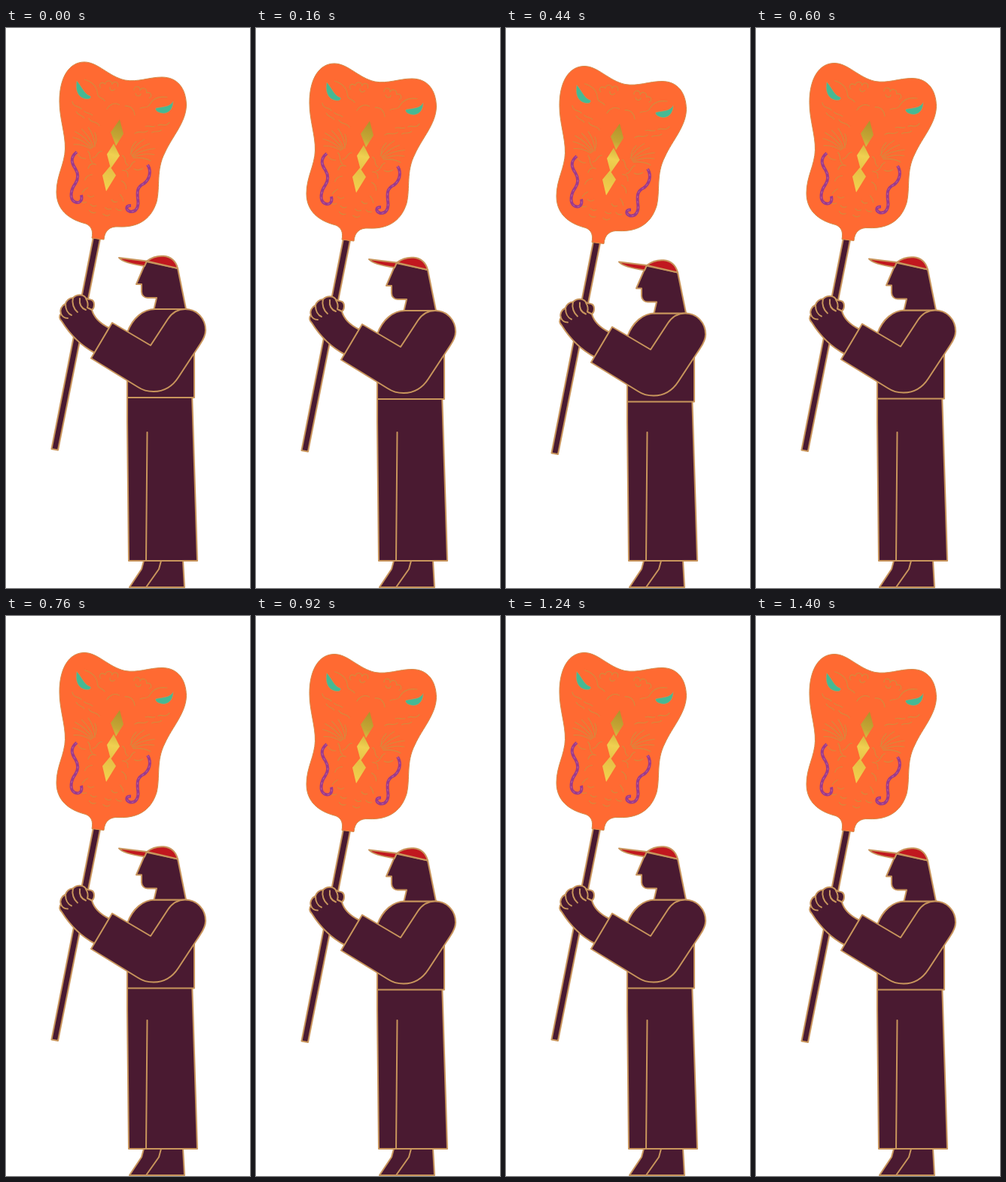
An HTML page that plays this animation: 324x741 px, repeating every 1.44 s.

```html
<!DOCTYPE html>
<html lang="en">
<head>
<meta charset="utf-8">
<title>Figure with a fan</title>
<style>
  html, body { margin: 0; width: 100%; height: 100%; overflow: hidden; background: #fff; }
  svg { display: block; width: 100vw; height: 100vh; }
  .cloth { fill: #4a1a31; stroke: #c8955c; stroke-width: 2; stroke-linejoin: round; stroke-linecap: round; }
  .line { fill: none; }
  .cap { fill: #c1181f; }
  .fan { fill: #ff6a32; stroke: #d58a48; stroke-width: 1; }
  .eye { fill: #45b994; stroke: #c8955c; stroke-width: .6; }
  .etch { fill: none; stroke: #d38b3d; stroke-width: 1.1; stroke-linecap: round; }
  .curl { fill: none; stroke: #9c3a8c; stroke-width: 4; }
  .glint { fill: none; stroke: #c0649a; stroke-width: 1; stroke-dasharray: 3 4; }
</style>
</head>
<body>
<svg viewBox="0 0 324 741">
  <defs>
    <linearGradient id="gold" gradientUnits="userSpaceOnUse" x1="153" y1="122" x2="130" y2="214">
      <stop offset="0" stop-color="#b0922a"/>
      <stop offset=".25" stop-color="#c5a634"/>
      <stop offset=".5" stop-color="#f0d050"/>
      <stop offset=".72" stop-color="#e6c246"/>
      <stop offset="1" stop-color="#f3d24e"/>
    </linearGradient>
    <g id="half" class="etch">
      <path d="M11,-15c-1,-7 8,-7 8,-1c1,-6 9,-5 9,1c6,-3 9,3 5,6M14,-11c2,4 7,3 7,-1"/>
      <path d="M56,-15C44,-14 38,-8 36,-2C34,6 28,3 24,7M4,8c8,-2 13,3 15,9"/>
      <path d="M66,17c-4,8 -10,3 -14,7M48,26c-4,3 -8,0 -12,3M58,29c-4,5 -8,2 -12,6M40,34c-5,6 -12,1 -16,7"/>
      <path d="M24,69q4,-14 14,-23M26,70q8,-13 20,-20M27,71q10,-11 27,-16M28,72q14,-9 27,-9M29,73q12,-4 23,-1M25,68q-3,-8 3,-17"/>
      <path d="M14,73c7,2 3,9 10,11M32,77c-6,3 -2,9 -9,13M18,92q8,-2 9,7M44,84q-5,5 -11,3M20,106q7,2 8,9"/>
      <path d="M22,124q4,3 6,8M12,133q4,4 8,1M6,145q4,3 8,0M20,143q3,3 8,1M5,154q5,3 9,-1"/>
    </g>
  </defs>

  <path class="cloth" d="M183,705L180,716L164,740H237L235,705Z"/>
  <path class="cloth line" d="M206,705L203,716L186,740"/>
  <path class="cloth" d="M161,483L161,520L163,705H254L247,483Z"/>
  <path class="cloth line" d="M187.5,535L186,705"/>

  <g id="upper">
    <path class="cloth" d="M161,489V403C168,384 182,372 198,372H240L250,400V489Z"/>
    <path class="cloth" d="M186,309L173,339H180V349C180,354 184,357 188,357H200L196.500,372H239L228,318Z"/>
    <path class="cloth cap" d="M187,308.500L150,304C154,309 170,313 184,315Z"/>
    <path class="cloth cap" d="M187,308.500C198,300 222,296 228,318Z"/>

    <path class="cloth" d="M116,277L125,279L69,558.500L60.500,557Z"/>
    <path class="cloth" d="M137,397C127,392 117,384 114,373C118,370 118,362 114,360C111,358 108,360 106,357
      C102,352 94,352 89,357C84,357 80,361 79,365C74,367 71,373 73,378C70,381 71,385 74,388C84,404 99,420 118,430Z"/>
    <path class="cloth line" d="M73,378C75,383 78,384 82,384M79,365C79,372 82,378 87,380M89,357C87,364 90,372 95,376M98,358C97,366 101,371 106,373M106,358Q110,364 108,370L114,373"/>
    <path class="cloth" d="M141,390L192,420L215,385C221,376 229,372 238,372C254,372 265,385 265,400
      C265,407 262,412 258,418L229,462C220,476 208,481 196,481C188,481 181,479 175,475L113,437Z"/>

    <path class="fan" d="M104,45C122,45 136,64 158,69C175,72 190,65 207,65C228,65 239,80 239.500,102
      C239,125 221,143 211,165C199,188 205,210 200,230C192,256 172,264 150,263C138,262 131,268 130,280
      L114,278C116,268 113,262 106,259C90,255 67,245 67,217C67,195 78,180 78.500,160C79,140 71,120 71,97C71,65 84,45 104,45Z"/>
    <g transform="translate(156 94.500) rotate(12)">
      <use href="#half"/>
      <use href="#half" transform="scale(-1 1)"/>
    </g>
    <path class="eye" d="M94,70C91,85 98,94 108,94C112,94 113,92 112,90C104,88 100,76 94,70Z"/>
    <path class="eye" d="M222,97C218,104 210,104 199,106C197,109 203,113 210,113C218,112 222,105 222,97Z"/>
    <g id="curls">
      <path class="curl" d="M94,164C84,172 88,180 92,186C97,194 96,200 92,206C86,214 84,226 91,230C97,233 102,229 100,221"/>
      <path class="curl" d="M188,181C194,190 190,201 183,206C174,210 174,217 175,226C177,238 172,244 165,243C159,241 158,235 166,235"/>
    </g>
    <path fill="url(#gold)" d="M151,121L156,140L146,156L139,138ZM143,153L151,169L139,186L134,167ZM138,183L146,195L133,216L128,195Z"/>
  </g>
</svg>
<script>
  const upper = document.getElementById('upper');
  const curls = document.getElementById('curls');
  for (const curl of [...curls.children]) {
    const glint = curl.cloneNode();
    glint.setAttribute('class', 'glint');
    curls.append(glint);
  }

  const STEP = 40, STEPS = 12, DROP = 6;
  const start = performance.now();

  // The body sinks evenly, then snaps back up.
  function draw() {
    const step = Math.floor((performance.now() - start) / STEP) % STEPS;
    upper.setAttribute('transform', `translate(0 ${step * DROP / STEPS})`);
    requestAnimationFrame(draw);
  }
  draw();
</script>
</body>
</html>
```
